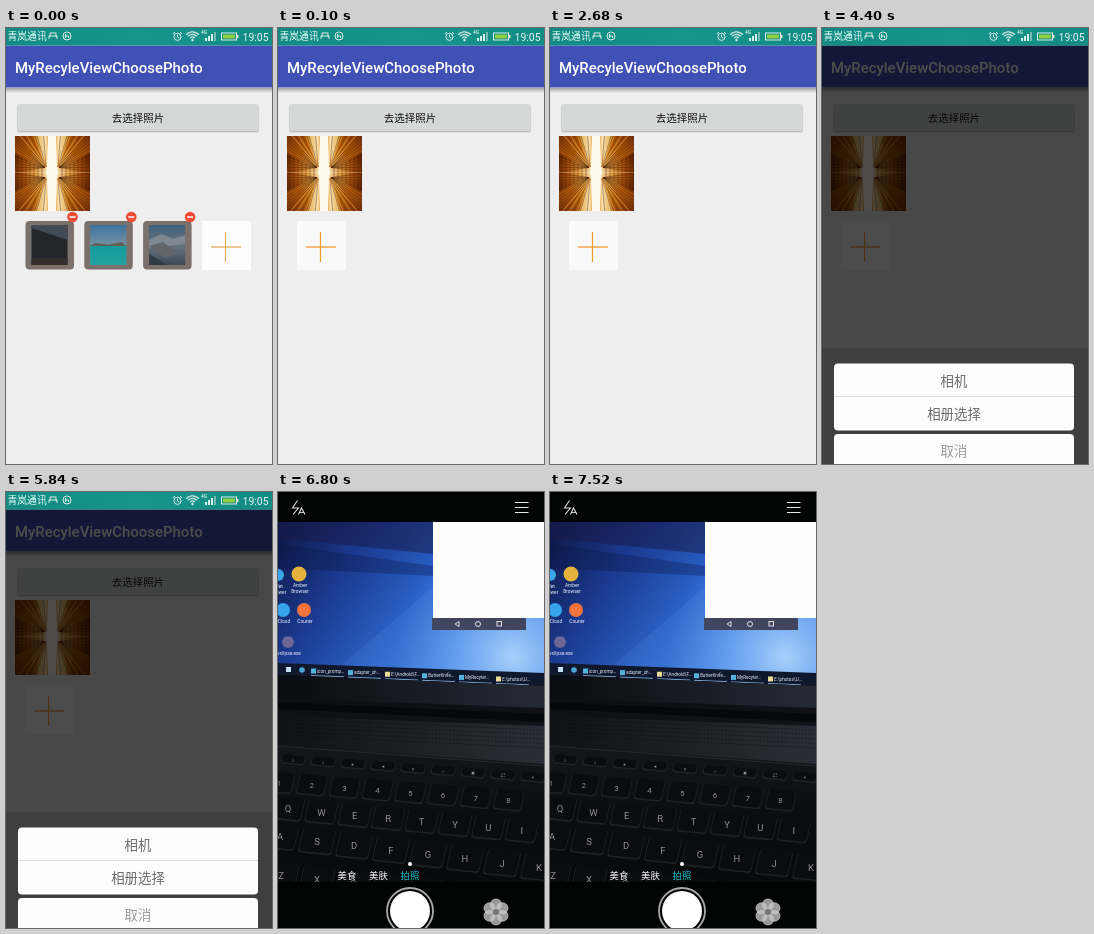
An HTML page with a canvas that plays this animation: 266 by 436 pixels, repeating every 8 s.

```html
<!DOCTYPE html>
<html lang="zh">
<head>
<meta charset="utf-8">
<title>Photo chooser</title>
<style>
html, body { margin: 0; width: 100%; height: 100%; overflow: hidden; background: #000; }
canvas { display: block; width: 266px; height: 436px; }
</style>
</head>
<body>
<canvas id="stage"></canvas>
<script>
const W = 266, H = 436, LOOP = 8000;
const CJK = '"Noto Sans CJK SC", "Noto Sans CJK", sans-serif';
const LATIN = 'Roboto, sans-serif';
const canvas = document.getElementById('stage');
const c = canvas.getContext('2d');
const ratio = window.devicePixelRatio || 1;
canvas.width = W * ratio;
canvas.height = H * ratio;

function rect(x, y, w, h, fill) {
  c.fillStyle = fill;
  c.fillRect(x, y, w, h);
}

function round(x, y, w, h, r, fill) {
  c.beginPath();
  c.roundRect(x, y, w, h, r);
  c.fillStyle = fill;
  c.fill();
}

function disc(x, y, r, fill) {
  c.beginPath();
  c.arc(x, y, r, 0, Math.PI * 2);
  c.fillStyle = fill;
  c.fill();
}

function ring(x, y, r, color, width = 1) {
  c.beginPath();
  c.arc(x, y, r, 0, Math.PI * 2);
  c.strokeStyle = color;
  c.lineWidth = width;
  c.stroke();
}

function poly(points, fill) {
  c.beginPath();
  points.forEach(([x, y]) => c.lineTo(x, y));
  c.closePath();
  c.fillStyle = fill;
  c.fill();
}

function line(points, color, width = 1) {
  c.beginPath();
  points.forEach(([x, y]) => c.lineTo(x, y));
  c.strokeStyle = color;
  c.lineWidth = width;
  c.stroke();
}

function text(value, x, y, size, color, { align = 'left', family = LATIN, weight = 400 } = {}) {
  c.font = `${weight} ${size}px ${family}`;
  c.textAlign = align;
  c.fillStyle = color;
  c.fillText(value, x, y);
}

function label(value, x, y, size, color, weight = 400) {
  text(value, x, y, size, color, { align: 'center', family: CJK, weight });
}

function fillStops(g, colors) {
  colors.forEach((color, i) => g.addColorStop(i / (colors.length - 1), color));
  return g;
}

function gradient(x0, y0, x1, y1, ...colors) {
  return fillStops(c.createLinearGradient(x0, y0, x1, y1), colors);
}

function glow(x, y, r, ...colors) {
  return fillStops(c.createRadialGradient(x, y, 0, x, y, r), colors);
}

function clipped(x, y, w, h, draw) {
  c.save();
  c.beginPath();
  c.rect(x, y, w, h);
  c.clip();
  draw();
  c.restore();
}

function statusBar() {
  const ink = '#d8eeeb';
  rect(0, 0, W, 17.5, gradient(0, 0, W, 0, '#128c82', '#18948a', '#128c82'));
  text('青岚通讯', 1.5, 12, 9.8, '#f2fffd', { family: CJK });
  line([[44, 9], [44, 5], [50, 5], [50, 9]], ink);
  line([[43, 8], [51, 8], [51, 11]], ink);
  line([[43, 8], [43, 11]], ink);
  ring(61, 8, 4, ink);
  line([[59.5, 6], [59.5, 10]], ink);
  line([[59.5, 8], [62.5, 8], [62.5, 10]], ink);

  ring(171.5, 8.8, 3.6, ink);
  line([[171.5, 6.5], [171.5, 9], [173.3, 10]], ink);
  line([[167, 5.8], [169, 4]], ink);
  line([[174, 4], [176, 5.8]], ink);
  for (const r of [3, 5.6, 8.2]) {
    c.beginPath();
    c.arc(186.5, 12, r, -Math.PI * 0.78, -Math.PI * 0.22);
    c.strokeStyle = ink;
    c.lineWidth = 1.3;
    c.stroke();
  }
  disc(186.5, 12, 1.2, ink);
  text('4G', 195, 6, 5, ink, { weight: 500 });
  for (let i = 0; i < 4; i++) {
    const h = 3 + i * 2;
    rect(199 + i * 3, 13 - h, 2, h, i < 3 ? ink : '#72b9b2');
  }
  c.strokeStyle = ink;
  c.lineWidth = 1;
  c.strokeRect(215.5, 5, 15, 7);
  rect(217, 6.5, 12, 4, '#8fd044');
  rect(231, 7, 1.5, 3, ink);
  text('19:05', 236.5, 12.5, 10.5, '#e6f6f4');
}

// Four mirrored facades meeting at a bright gap of sky.
function building() {
  clipped(9, 108, 75, 75, () => {
    rect(9, 108, 75, 75, '#fffaf0');
    c.translate(46, 144.5);
    for (const sx of [-1, 1]) for (const sy of [-1, 1]) {
      c.save();
      c.scale(sx, sy);
      poly([[6, 0], [39, 0], [39, 39], [4, 39], [5, 6]],
        gradient(5, 0, 39, 10, '#f7dcab', '#dd9a40', '#a8500a', '#5c2003'));
      poly([[6, 5], [39, 20], [39, 39], [17, 39]],
        gradient(6, 5, 36, 36, '#e9b865', '#b8610c', '#7a3204'));
      poly([[6, 5], [5, 39], [17, 39]], gradient(5, 0, 17, 0, '#fbe9c4', '#dda648'));
      for (let i = 0; i < 10; i++) {
        line([[7, 5], [39, 1 + i * 4]], '#4a1a0388', 0.8);
        line([[6, 6], [5 + i * 3.6, 39]], i % 2 ? '#55250688' : '#ffc55a99', 0.8);
      }
      for (let x = 10; x < 39; x += 4) {
        line([[x, 0], [x, x * 0.5]], '#52200488', 0.9);
      }
      c.restore();
    }
  });
}

function page() {
  rect(0, 0, W, H, '#eeeeee');
  rect(0, 60, W, 5, gradient(0, 60, 0, 65, '#00000050', '#00000000'));
  rect(0, 17.5, W, 42, '#3f51b5');
  text('MyRecyleViewChoosePhoto', 9, 45, 14.95, '#fff', { weight: 500 });
  round(11, 77, 242, 28, 2, '#00000012');
  round(11.5, 76.5, 241, 27.5, 2, '#00000028');
  round(11.5, 76, 241, 27, 2, '#d6d7d7');
  label('去选择照片', 132, 93.8, 10.5, '#111', 500);
  building();
}

function addTile(x, fill, color) {
  rect(x, 193, 49, 49, fill);
  line([[x + 9, 219], [x + 39, 219]], color, 1.3);
  line([[x + 23.5, 204], [x + 23.5, 234]], color, 1.2);
}

const pictures = [
  x => {
    rect(x, 197, 36, 40, '#24262c');
    poly([[x, 197], [x + 36, 197], [x + 36, 212], [x, 200]], '#414a55');
    rect(x, 230, 36, 7, '#332f2d');
  },
  x => {
    rect(x, 197, 36, 40, gradient(0, 197, 0, 218, '#3d749f', '#7793a3'));
    rect(x, 217, 36, 20, gradient(0, 217, 0, 237, '#149b9e', '#22a3a0'));
    poly([[x, 218], [x + 5, 215], [x + 18, 216.5], [x + 31, 214], [x + 36, 218]], '#625f52');
  },
  x => {
    rect(x, 197, 36, 40, gradient(0, 197, 0, 237, '#3f607c', '#68747f', '#3c4854'));
    poly([[x, 212], [x + 12, 206], [x + 24, 211], [x + 36, 207], [x + 36, 216], [x, 220]], '#7f8890');
    poly([[x, 218], [x + 14, 214], [x + 30, 226], [x + 16, 230]], '#62646a');
    poly([[x, 226], [x + 18, 237], [x, 237]], '#303a44');
  }
];

function photoTiles() {
  pictures.forEach((draw, i) => {
    const x = 19.5 + i * 58.8;
    round(x, 193, 48.5, 48.5, 4, '#7a716c');
    draw(x + 6);
    disc(x + 47, 189, 5.3, '#ee4a34');
    rect(x + 44, 188.3, 6, 1.5, '#fff');
  });
}

function gallery() {
  page();
  photoTiles();
  addTile(196, '#fdfdfd', '#e3a85c');
  statusBar();
}

function cleared() {
  page();
  addTile(19, '#f9f9f9', '#f59a2c');
  statusBar();
}

function menu() {
  page();
  addTile(19, '#f9f9f9', '#f59a2c');
  rect(0, 17.5, W, H, '#000000b2');
  rect(0, 320, W, H - 320, '#00000020');
  round(12, 335.5, 240, 67, 4, '#fdfdfd');
  rect(12, 368, 240, 1, '#dcdcdc');
  round(12, 406, 240, 40, 4, '#fdfdfd');
  label('相机', 132, 357.6, 13.4, '#6a6a6a');
  label('相册选择', 132, 391, 13.4, '#6a6a6a');
  label('取消', 132, 428, 13.4, '#9c9c9c');
  statusBar();
}

function desktop() {
  const screen = [[0, 30], [W, 30], [W, 194], [0, 176]];
  poly(screen, gradient(0, 40, 190, 170, '#0e1846', '#1b3a90', '#2a62c8', '#4b8ae6'));
  poly(screen, glow(235, 165, 120, '#c4e2ffdd', '#78b0f688', '#4b8ae600'));
  poly([[0, 30], [155, 30], [155, 62], [0, 46]], '#1a1c4c88');
  poly([[0, 52], [155, 74], [155, 84], [0, 76]], '#0a174555');
  poly([[60, 176], [155, 95], [W, 132], [W, 188]], '#6aa5ee22');
  rect(155, 30, 111, 96, '#fefeff');
  poly([[154, 126], [248, 126], [248, 138], [154, 138]], '#414560');
  line([[181, 129.5], [177, 132], [181, 134.5], [181, 129.5]], '#eee', 0.9);
  ring(200, 132, 2.5, '#eee', 0.9);
  c.strokeRect(219, 129.5, 4.5, 4.5);

  const icons = [
    [0, 83, 6, '#37a5e8', 'Net', 'Viewer'],
    [21, 82, 7.5, '#e3b23c', 'Amber', 'Browser'],
    [5, 118, 7, '#35a4ea', 'Cloud', ''],
    [26, 118, 7, '#f0743c', 'Courier', ''],
    [10, 150, 6, '#6d6594', 'eclipse.exe', '']
  ];
  for (const [x, y, r, color, first, second] of icons) {
    disc(x, y, r, color);
    text(first, x + 1, y + 13, 4.8, '#f1f5ff', { align: 'center' });
    text(second, x + 1, y + 18.5, 4.8, '#f1f5ff', { align: 'center' });
  }

  poly([[0, 171], [W, 181], [W, 195], [0, 184]], '#10182e');
  rect(8, 175, 5, 5, '#c8ddf2');
  disc(24, 178, 2.8, '#48a8dc');
  const tasks = ['icon_promp…', 'adapter_sh…', 'E:\\Android\\F…', 'ButterKnife…', 'MyRecyler…', 'E:\\photos\\U…'];
  tasks.forEach((name, i) => {
    const x = 36 + i * 37, y = 179.5 + i * 1.6;
    rect(x - 3, y - 3, 5, 5, i === 2 || i === 5 ? '#eedb9a' : '#53b4df');
    text(name, x + 3, y + 1, 4.6, '#e6edf6');
    line([[x - 3, y + 4], [x + 30, y + 5.3]], '#8cc2ee', 0.8);
  });
}

function key(x, y, w, h) {
  c.save();
  c.translate(x, y);
  c.transform(1, 0.1, -0.22, 1, 0, 0);
  round(-w / 2, -h / 2, w, h, 3, '#202125');
  round(-w / 2 + 0.8, -h / 2 - 0.4, w - 1.6, h - 1.2, 3, '#0b0c0f');
  c.restore();
}

// Letters, first centre x and y, step x and y, key width and height, type size.
const keyRows = [
  ['⌂♪▸◂×☼☀⇄+', 15, 268, 30, 2.2, 24, 9, 5],
  ['12345678', 1, 291, 32.8, 2.5, 28, 20, 8],
  ['QWERTYUI', 10, 317, 33.4, 3.1, 30, 23, 9.5],
  ['ASDFGHJK', 2, 345, 37, 4.4, 33, 25, 9.5],
  ['ZXCVBNM', 3, 384, 36, 4, 32, 26, 9.5]
];

function laptop() {
  poly([[0, 183], [W, 194], [W, 390], [0, 390]],
    gradient(0, 190, 0, 390, '#0b0c11', '#15161b', '#0c0d10', '#08090b'));
  poly([[0, 183], [W, 194], [W, 216], [0, 206]], gradient(0, 0, W, 0, '#0a0b10', '#252a36'));
  poly([[0, 210], [W, 222], [W, 230], [0, 217]], '#06070a');
  poly([[0, 224], [W, 234], [W, 272], [0, 253]], gradient(0, 0, W, 0, '#101116', '#2b2e36'));
  c.setLineDash([1.5, 2]);
  for (let i = 0; i < 5; i++) {
    line([[0, 227 + i * 4], [W, 238 + i * 4.5]], '#08090c88', 1);
  }
  c.setLineDash([]);
  line([[0, 254], [W, 274]], '#2c2e35', 0.8);
  for (const [letters, x0, y0, dx, dy, w, h, size] of keyRows) {
    [...letters].forEach((letter, i) => {
      const x = x0 + i * dx, y = y0 + i * dy;
      key(x, y, w, h);
      text(letter, x, y + size * 0.36, size, '#90908c', { align: 'center' });
    });
  }
}

function cameraControls() {
  rect(0, 0, W, 30, '#020303');
  line([[19.5, 8.5], [14.5, 16], [20.5, 16], [15, 22.5]], '#dedede', 1.1);
  line([[20.5, 22.5], [23.5, 16], [27, 22.5]], '#dedede', 1.1);
  line([[21.5, 20.5], [26, 20.5]], '#dedede', 0.9);
  for (const y of [10.5, 15.5, 20.5]) line([[237, y], [250.5, y]], '#e8e8e8', 1);

  rect(0, 390, W, 46, '#020303');
  disc(132, 372, 2, '#fff');
  label('美食', 69, 386.5, 9.4, '#fff', 500);
  label('美肤', 100.5, 386.5, 9.4, '#fff', 500);
  label('拍照', 132, 386.5, 9.4, '#16c2cf', 500);
  disc(132, 419, 20, '#fff');
  ring(132, 419, 23, '#aaa', 1.8);
  for (let i = 0; i < 6; i++) {
    const a = Math.PI * (i / 3 + 1 / 6);
    const x = 218 + Math.cos(a) * 7.5, y = 420 + Math.sin(a) * 7.5;
    disc(x, y, 5.8, '#c4c4c4c8');
    ring(x, y, 5.6, '#f2f2f277', 0.6);
  }
  disc(218, 420, 3, '#777');
}

function camera() {
  rect(0, 0, W, H, '#020303');
  clipped(0, 30, W, 360, () => {
    desktop();
    laptop();
  });
  cameraControls();
}

const scenes = [[6800, camera], [4400, menu], [100, cleared], [0, gallery]];
const start = performance.now();

function frame() {
  const time = (performance.now() - start) % LOOP;
  const [, draw] = scenes.find(([from]) => time >= from);
  c.setTransform(ratio, 0, 0, ratio, 0, 0);
  draw();
  requestAnimationFrame(frame);
}
frame();
</script>
</body>
</html>
```
